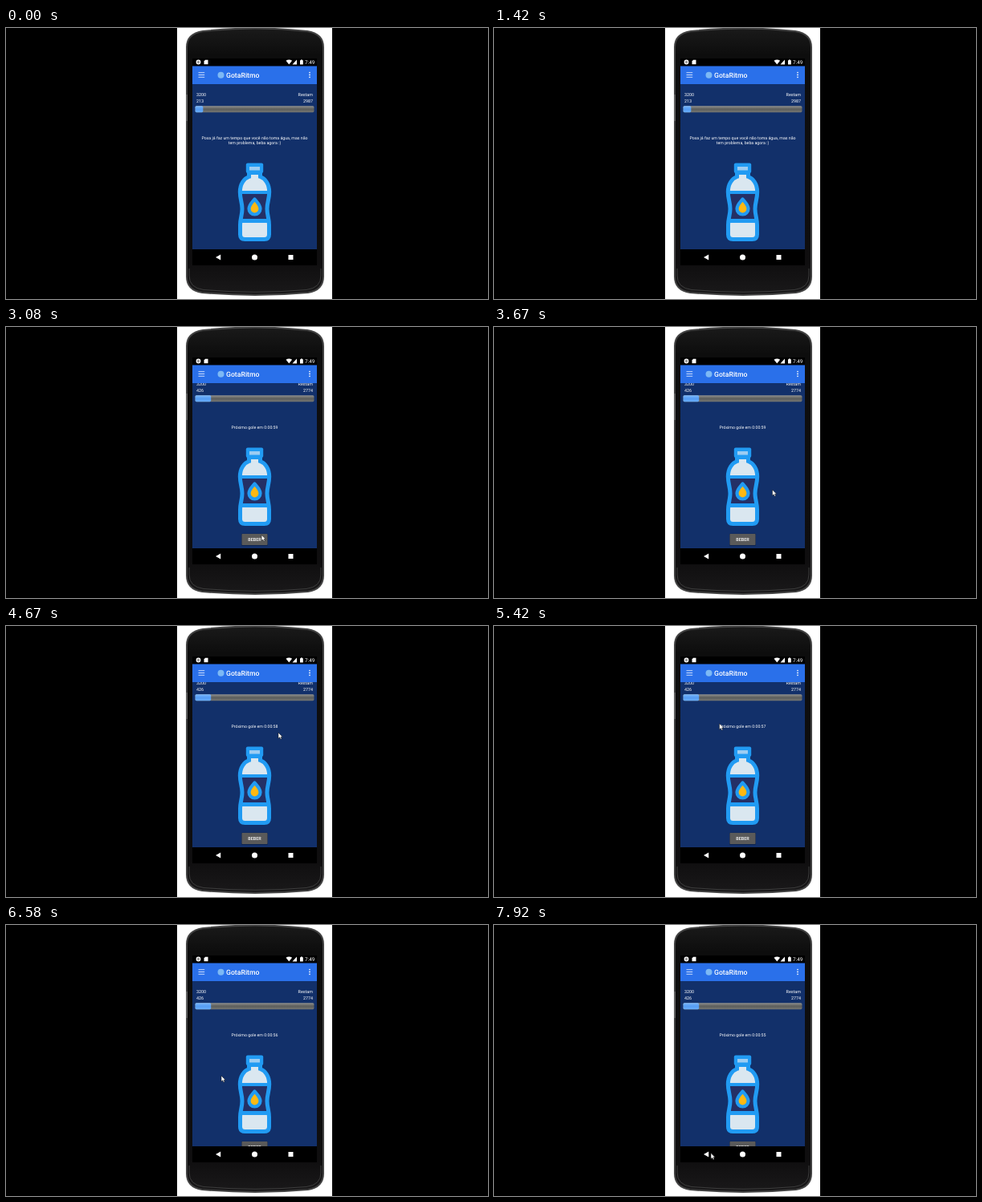
Recreate the animation shown at these times as an HTML page. Size 600 by 338 pixels, loop 8 s.

```html
<!DOCTYPE html>
<html lang="pt">
<head>
<meta charset="utf-8">
<title>Lembrete de água</title>
<style>
  html, body { margin: 0; width: 100%; height: 100%; overflow: hidden; background: #000; }
  svg { display: block; width: 100vw; height: 100vh; }
  text { font: 5.4px Roboto, sans-serif; fill: #fff; text-rendering: geometricPrecision; }
  .middle { text-anchor: middle; }
  .right { text-anchor: end; }
  .message { font-size: 5.25px; }
  .clock { font-size: 6.4px; }
  .title { font-size: 8.7px; font-weight: 500; }
  .action { font-size: 5.5px; font-weight: 500; }
</style>
</head>
<body>
<svg viewBox="0 0 600 338">
  <defs>
    <linearGradient id="shell" x2="0" y2="1">
      <stop stop-color="#1a1a1a"/><stop offset=".1" stop-color="#0d0d0d"/>
      <stop offset=".88" stop-color="#0f0e0f"/><stop offset="1" stop-color="#1a191a"/>
    </linearGradient>
    <linearGradient id="track" x2="0" y2="1">
      <stop stop-color="#92928f"/><stop offset=".5" stop-color="#5c5e5c"/><stop offset="1" stop-color="#757673"/>
    </linearGradient>
    <linearGradient id="filled" x2="0" y2="1">
      <stop stop-color="#7db9fa"/><stop offset=".5" stop-color="#559df5"/><stop offset="1" stop-color="#69adf8"/>
    </linearGradient>
    <clipPath id="page"><rect x="232" y="70" width="155" height="206"/></clipPath>
    <path id="bottleShape" d="M-7 12V17C-13 19-18.2 26-18.2 36C-18.2 45-15.5 49-15.5 57S-18 69-18 77V89Q-18 95-12 95H12Q18 95 18 89V77C18 69 15.5 65 15.5 57S18.2 45 18.2 36C18.2 26 13 19 7 17V12Z"/>
    <clipPath id="inside"><use href="#bottleShape"/></clipPath>
  </defs>

  <!-- phone -->
  <rect x="213" width="193" height="338" fill="#fff"/>
  <path d="M225 24Q225 7 245 4Q310-3 375 4Q395 7 395 24V310Q395 327 376 330Q310 336 244 330Q225 327 225 310Z" fill="url(#shell)" stroke="#424242" stroke-width="2"/>
  <path d="M228 300V309Q228 324 246 326.500Q310 332 374 326.500Q392 324 392 309V300" fill="none" stroke="#3c3c3c"/>
  <path d="M225.200 83V116" stroke="#6a6a6a" stroke-width="1.600"/>

  <!-- page -->
  <rect x="232" y="38" width="155" height="258"/>
  <rect x="232" y="70" width="155" height="206" fill="#12306a"/>
  <g clip-path="url(#page)">
    <g id="content">
      <text x="237" y="84.500">3200</text>
      <text x="382" y="84.500" class="right">Restam</text>
      <text x="237" y="93.400" id="drunk"></text>
      <text x="382" y="93.400" class="right" id="remaining"></text>
      <rect x="235.500" y="97.200" width="148" height="8" rx="1.600" fill="url(#track)"/>
      <rect x="235.500" y="97.200" height="8" rx="1.600" fill="url(#filled)" id="progress"/>
      <text x="309.500" y="139.200" class="middle message" id="line1"></text>
      <text x="309.500" y="145.200" class="middle message" id="line2">tem problema, beba agora :)</text>
      <g id="lower">
        <g transform="translate(309.500 168.500)">
          <g clip-path="url(#inside)">
            <rect x="-22" width="44" height="98" fill="#dae7f0"/>
            <rect x="-22" y="34.500" width="44" height="40" fill="#219bf3"/>
            <rect x="-22" y="38.500" width="44" height="31" fill="#243066"/>
          </g>
          <use href="#bottleShape" fill="none" stroke="#219bf3" stroke-width="5"/>
          <rect x="-10.700" width="21.400" height="12.500" rx="2" fill="#219bf3"/>
          <rect x="-6.500" y="4.500" width="13" height="4.500" fill="#9dcdf2"/>
          <path d="M0 45C2.500 48.500 7 52 7 57A7 7 0 0 1-7 57C-7 52-2.500 48.500 0 45Z" fill="#fdb813" stroke="#219bf3" stroke-width="4.200" stroke-linejoin="round"/>
        </g>
        <rect x="293" y="275.800" width="33" height="15" rx="1" fill="#0c2048"/>
        <rect x="293.500" y="276" width="32" height="14" rx=".8" fill="#5a5a5a"/>
        <text x="309.500" y="285.100" class="middle action">BEBER</text>
      </g>
    </g>
  </g>

  <!-- toolbar -->
  <rect x="232" y="47.500" width="155" height="22.500" fill="#2a70ea"/>
  <path d="M239.500 55.700H247.200M239.500 58.500H247.200M239.500 61.300H247.200" stroke="#dce8ff" stroke-width=".9"/>
  <circle cx="267.500" cy="58.800" r="4" fill="#7db9f5"/>
  <text x="274" y="62" class="title">GotaRitmo</text>
  <path d="M378 55.500h0M378 58.400h0M378 61.300h0" stroke="#fff" stroke-width="1.700" stroke-linecap="round"/>

  <!-- status bar -->
  <circle cx="239.500" cy="42.500" r="2.300" fill="#999" stroke="#fff" stroke-width="1.200"/>
  <path d="M248 39.800h3.500v5.400h-5v-3.800Z" fill="#fff"/>
  <path d="M348.500 40.800Q352.300 38.200 356.100 40.800L352.300 45.500ZM362 39.500V45.500H356.500ZM366 40.200h1v-.8h1.800v.8h1v5.400h-3.800Z" fill="#fff"/>
  <text x="372" y="45" class="clock">7:49</text>

  <!-- navigation bar -->
  <path d="M261 286L267.200 282.500V289.500ZM351.500 283h6v6h-6Z" fill="#fff"/>
  <circle cx="309.500" cy="286" r="3.500" fill="#fff"/>

  <path id="cursor" d="M0 0V7.200L1.700 5.700L2.900 8.200L4.100 7.600L3.100 5.200H5.200Z" fill="#fff" stroke="#111" stroke-width=".5"/>
</svg>

<script>
const LOOP = 8000, STEP = 1000 / 12;
const GOAL = 3200, SIP = 213;
const CURSOR_TIME = 2.41, DRINK_TIME = 3;

// Keys: time in seconds, then values. Neighbours one step apart make a jump.
const scrollKeys = [[0, 0], [2.34, 0], [2.41, 18], [2.92, 18], [2.99, 12], [6.34, 12], [6.58, 0]];
const cursorKeys = [
  [0, 316.5, 262.5], [3, 316.5, 262.5], [3.6, 346.5, 203], [4.05, 346.5, 203],
  [4.65, 339, 133], [4.9, 339, 133], [5.3, 290, 131], [5.67, 250, 92],
  [5.92, 258, 296], [6.17, 266, 240], [6.34, 267, 176], [6.58, 268, 188],
  [7.05, 244, 58], [7.4, 246, 73], [7.65, 285, 200], [7.83, 274, 296], [7.91, 270, 284.5]
];

const el = id => document.getElementById(id);
const show = (id, visible) => el(id).setAttribute('visibility', visible ? 'visible' : 'hidden');
const move = (id, x, y) => el(id).setAttribute('transform', `translate(${x} ${y})`);

function sample(keys, t) {
  const next = keys.findIndex(key => key[0] > t);
  if (next < 0) return keys.at(-1).slice(1);
  const a = keys[next - 1], b = keys[next];
  const p = (t - a[0]) / (b[0] - a[0]);
  const eased = p * p * (3 - 2 * p);
  return a.slice(1).map((v, i) => v + (b[i + 1] - v) * eased);
}

function draw(now) {
  const t = Math.floor((now % LOOP + 5) / STEP) * STEP / 1000;
  const sinceDrink = t - DRINK_TIME + 0.001;
  const drank = sinceDrink >= 0;
  const amount = drank ? SIP * 2 : SIP;

  el('drunk').textContent = amount;
  el('remaining').textContent = GOAL - amount;
  el('progress').setAttribute('width', 148 * amount / GOAL);
  el('line1').textContent = drank
    ? `Próximo gole em 0:00:${59 - Math.floor(sinceDrink)}`
    : 'Poxa já faz um tempo que você não toma água, mas não';
  show('line2', !drank);
  move('lower', 0, drank ? -6 : 0);
  move('content', 0, -sample(scrollKeys, t)[0]);

  show('cursor', t > CURSOR_TIME);
  move('cursor', ...sample(cursorKeys, t));
  requestAnimationFrame(tick);
}

const tick = () => draw(performance.now());
tick();
</script>
</body>
</html>
```
